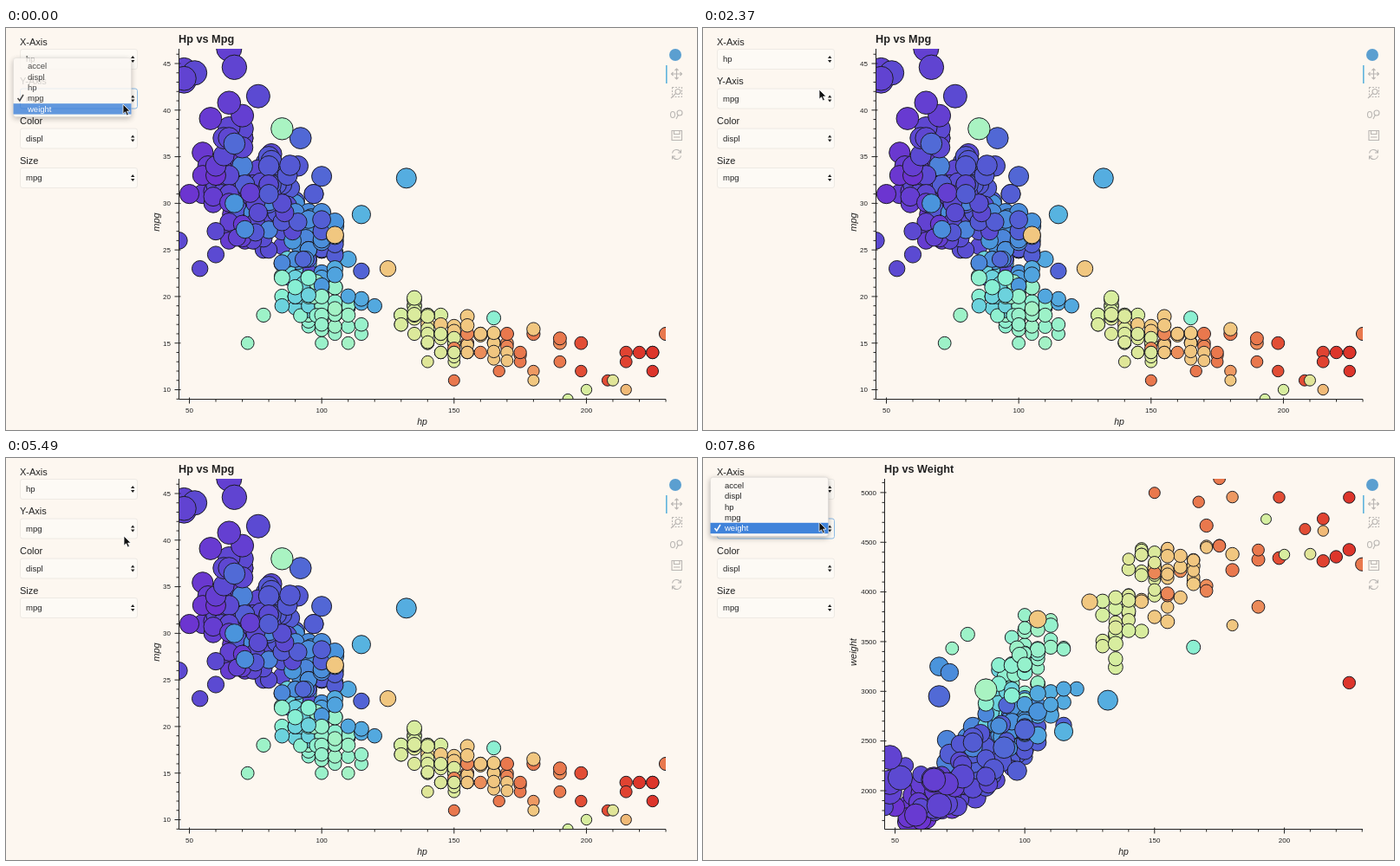
Recreate the animation shown at these times as an HTML page. Size 797 by 464 pixels, loop 8000 ms.

```html
<!DOCTYPE html>
<html lang="en">
<head>
<meta charset="utf-8">
<title>Scatter explorer</title>
<style>
html, body { margin: 0; width: 100%; height: 100%; overflow: hidden; background: #fdf7f0; }
svg { display: block; width: 797px; height: 464px; font-family: "Liberation Sans", Arial, sans-serif; fill: #222; }
.dots circle { stroke: #1c1c22; stroke-width: 1; }
.line { stroke: #222; stroke-width: 1; fill: none; }
.icon { stroke: #b9b6b3; stroke-width: 1.1; fill: none; }
.box { fill: #fdfaf5; stroke: #eeeae4; }
.box.focus { stroke: #8dbbe6; }
.menu { filter: drop-shadow(0 2px 3px rgba(0, 0, 0, .3)); }
</style>
</head>
<body>
<svg id="stage" viewBox="0 0 797 464"></svg>
<script>
const stage = document.getElementById('stage');
const LOOP = 8000, TOP = 24, BOTTOM = 428, RIGHT = 761;

function el(parent, tag, attrs = {}, text) {
  const node = document.createElementNS('http://www.w3.org/2000/svg', tag);
  for (const k in attrs) node.setAttribute(k, attrs[k]);
  if (text !== undefined) node.textContent = text;
  parent.appendChild(node);
  return node;
}
// Text centred vertically on y
function label(parent, x, y, size, text, attrs = {}) {
  return el(parent, 'text', { x, y: y + size * .35, 'font-size': size, ...attrs }, text);
}
const line = (parent, d, cls = 'line') => el(parent, 'path', { d, class: cls });
const lerp = (a, b, t) => a + (b - a) * t;

let seed = 20;
function rnd() {
  seed = (seed + 0x6D2B79F5) | 0;
  let t = Math.imul(seed ^ (seed >>> 15), 1 | seed);
  t = (t + Math.imul(t ^ (t >>> 7), 61 | t)) ^ t;
  return ((t ^ (t >>> 14)) >>> 0) / 4294967296;
}

const STOPS = ['7030d0', '5552d2', '4a93dc', '5cc0e2', '84efd6', 'a8f3c2', 'd2f2a3', 'f2d58a', 'f0a368', 'e4583a', 'dd352b'];
function rainbow(t) {
  t = Math.min(.9999, Math.max(0, t)) * (STOPS.length - 1);
  const i = Math.floor(t);
  const part = (s, k) => parseInt(s.substr(k, 2), 16);
  return `rgb(${[0, 2, 4].map(k => Math.round(lerp(part(STOPS[i], k), part(STOPS[i + 1], k), t - i)))})`;
}

// Outliers: hp, mpg, weight, displ, accel
const LIGHT = [
  [72, 15, 3432, 250, 21], [78, 18, 3574, 250, 21], [46, 26, 1835, 97, 20.5],
  [54, 23, 2254, 97, 23.5], [60, 27, 1834, 97, 19], [60, 24.5, 2164, 98, 22.1],
  [67, 30, 3250, 146, 21.8], [71, 27.2, 3190, 141, 24.8], [67, 36.4, 2950, 121, 19.9],
  [48, 43.1, 1985, 90, 21.5], [48, 44.3, 2085, 90, 21.7], [52, 44, 2130, 97, 24.6],
  [48, 43.4, 2335, 90, 23.7], [65, 46.6, 2110, 86, 17.9], [67, 44.6, 1850, 91, 13.8],
  [76, 41.5, 2144, 98, 14.7], [70, 39.4, 2070, 85, 18.6], [65, 40.8, 2110, 85, 19.2],
  [58, 39.1, 1755, 79, 16.9], [105, 26.6, 3725, 350, 19], [125, 23, 3900, 350, 17.4],
  [115, 28.8, 2595, 173, 11.3], [132, 32.7, 2910, 168, 11.4], [165, 17.7, 3445, 231, 13.4],
  [100, 32.9, 2615, 119, 14.8], [92, 37, 2434, 120, 15], [85, 38, 3015, 262, 17]
];
const HEAVY = [
  [198, 15, 4341, 429, 10], [220, 14, 4354, 454, 9], [215, 14, 4312, 440, 8.5],
  [225, 14, 4425, 455, 10], [225, 14, 3086, 455, 10], [198, 12, 4952, 429, 11.5],
  [208, 11, 4633, 429, 11], [215, 13, 4735, 440, 11], [225, 12, 4951, 455, 11],
  [230, 16, 4278, 400, 9.5], [190, 15, 3850, 390, 8.5], [190, 15.5, 4325, 400, 12],
  [190, 13, 4422, 400, 12.5], [215, 10, 4615, 360, 14], [200, 10, 4376, 307, 15],
  [210, 11, 4382, 318, 13.5], [193, 9, 4732, 304, 18.5], [175, 13, 5140, 400, 12],
  [180, 12, 4955, 383, 11.5], [167, 12, 4906, 400, 12.5], [150, 11, 4997, 400, 14],
  [180, 11, 3664, 350, 11], [180, 16, 4220, 400, 11], [180, 16.5, 4380, 350, 12.1],
  [170, 16, 4668, 400, 11.5], [175, 14, 4464, 400, 11.5], [155, 16.9, 4360, 350, 14.9]
];
// Clusters: count, then from/to for hp, mpg, weight, displ, accel
const CLUSTERS = [
  [36, 126, 153, 20.5, 12.6, 3150, 4650, 302, 318, 15.5, 11],
  [24, 140, 180, 18, 11.8, 3650, 4700, 345, 353, 14.5, 11],
  [8, 145, 185, 16.5, 12, 3700, 4750, 383, 402, 13, 9],
  [56, 83, 117, 23, 14.6, 2620, 3950, 225, 258, 15, 19.5],
  [16, 80, 102, 25, 17.5, 2550, 3300, 198, 200, 15, 18],
  [20, 84, 126, 29, 15.5, 2400, 3150, 151, 173, 16.5, 12.5],
  [46, 70, 113, 35, 18.5, 2150, 3050, 134, 151, 17.5, 13],
  [56, 64, 114, 37, 19, 1950, 2900, 105, 122, 17, 13.5],
  [50, 56, 97, 39, 21.5, 1750, 2420, 91, 104, 18, 14],
  [36, 48, 78, 38.5, 25, 1600, 2200, 70, 91, 19.5, 15]
];

function makeCars() {
  const cars = [];
  for (const [n, ...range] of CLUSTERS) {
    for (let i = 0; i < n; i++) {
      const base = rnd();
      const [hp, mpg, weight, displ, accel] = [0, 2, 4, 6, 8].map(k =>
        lerp(range[k], range[k + 1], base * .55 + rnd() * .45));
      const step = hp < 98 ? (rnd() < .4 ? 5 : 1) : 5;
      cars.push({
        hp: Math.round(hp / step) * step,
        mpg: rnd() < .6 ? Math.round(mpg) : mpg,
        weight, displ, accel, order: rnd()
      });
    }
  }
  [...HEAVY, ...LIGHT].forEach(([hp, mpg, weight, displ, accel], i) =>
    cars.push({ hp, mpg, weight, displ, accel, order: 1 + i }));
  return cars.sort((a, b) => a.order - b.order);
}

const cars = makeCars();
const tint = {
  displ: c => rainbow((c.displ - 68) / 387),
  accel: c => rainbow((c.accel - 8) / 16.8)
};
const AXES = {
  mpg: { title: 'Hp vs Mpg', left: 199, x50: 211.5, kx: 3.053, v0: 10, y0: 417.5, ky: 10.757, major: 5, lo: 9, hi: 46 },
  weight: { title: 'Hp vs Weight', left: 209, x50: 221.5, kx: 2.993, v0: 2000, y0: 384, ky: .1147, major: 500, lo: 1700, hi: 5100 }
};

function drawPlot(name, colour) {
  const a = AXES[name], g = el(stage, 'g');
  const px = hp => a.x50 + (hp - 50) * a.kx;
  const py = v => a.y0 - (v - a.v0) * a.ky;
  const clip = 'clip-' + name + colour;
  el(el(g, 'clipPath', { id: clip }), 'rect', { x: a.left, y: TOP, width: RIGHT - a.left, height: BOTTOM - TOP });

  label(g, a.left, 12.5, 12.7, a.title, { 'font-weight': 'bold' });
  const dots = el(g, 'g', { class: 'dots', 'clip-path': `url(#${clip})` });
  for (const c of cars) {
    el(dots, 'circle', {
      cx: px(c.hp).toFixed(1), cy: py(c[name]).toFixed(1),
      r: (6 + (c.mpg - 9) * .23).toFixed(1), fill: tint[colour](c)
    });
  }

  const x0 = a.left + .5, yb = BOTTOM + .5;
  let d = `M${x0} ${TOP}V${yb}H${RIGHT}`;
  for (let hp = 50; hp <= 230; hp += 10) {
    const big = hp % 50 === 0;
    d += `M${px(hp)} ${yb - (big ? 2 : 0)}V${yb + (big ? 5 : 3)}`;
    if (big) label(g, px(hp), 441, 8, hp, { 'text-anchor': 'middle' });
  }
  for (let v = a.lo; v <= a.hi; v += a.major / 5) {
    const big = v % a.major === 0;
    d += `M${x0 + (big ? 2 : 0)} ${py(v)}H${x0 - (big ? 5 : 3)}`;
    if (big) label(g, a.left - 9, py(v), 8, v, { 'text-anchor': 'end' });
  }
  line(g, d);
  const italic = { 'font-style': 'italic', 'text-anchor': 'middle' };
  label(g, (a.left + RIGHT) / 2, 454, 10.5, 'hp', italic);
  label(g, 0, 0, 11, name, { ...italic, transform: 'translate(173 224) rotate(-90)' });
  return g;
}

const plots = [drawPlot('mpg', 'displ'), drawPlot('weight', 'displ'), drawPlot('mpg', 'accel')];

function drawTools() {
  el(stage, 'circle', { cx: 772, cy: 31, r: 7, fill: '#5b9fd0' });
  el(stage, 'rect', { x: 761, y: 43, width: 1.6, height: 21, fill: '#5fb4dc' });
  line(stage, 'M767.5 53H779.5M773.5 47V59M769.5 51L767.5 53L769.5 55M777.5 51L779.5 53L777.5 55M771.5 49L773.5 47L775.5 49M771.5 57L773.5 59L775.5 57', 'icon');
  el(stage, 'rect', { x: 768.5, y: 68.5, width: 11, height: 11, class: 'icon', 'stroke-dasharray': '2 1.5' });
  line(stage, 'M772 76L767 81M778 73.5A3 3 0 1 1 772 73.5A3 3 0 1 1 778 73.5', 'icon');
  line(stage, 'M771.5 100A2.5 3.5 0 1 1 766.5 100A2.5 3.5 0 1 1 771.5 100M780 98A3 3 0 1 1 774 98A3 3 0 1 1 780 98M775 101L773 105', 'icon');
  line(stage, 'M768 118.5H779.5V129.5H768ZM770.5 118.5V122.5H777V118.5M770 126H777.5', 'icon');
  line(stage, 'M768.5 144.5A5 5 0 0 1 778 143.5M778.5 140.5V144H775M778.5 147.5A5 5 0 0 1 769 148.5M768.5 151.5V148H772', 'icon');
}
drawTools();

const ROW = 12.4;
const FIELDS = ['accel', 'displ', 'hp', 'mpg', 'weight'];

function drawSelect(name, y, value) {
  label(stage, 16, y - 20, 11, name);
  const box = el(stage, 'rect', { x: 16.5, y: y - 11.5, width: 135, height: 23, rx: 2.5, class: 'box' });
  const text = label(stage, 23, y, 9.5, value);
  el(stage, 'path', { d: `M144 ${y - 1}L146.2 ${y - 4}L148.4 ${y - 1}ZM144 ${y + 1}L146.2 ${y + 4}L148.4 ${y + 1}Z` });
  return { box, text };
}
drawSelect('X-Axis', 36, 'hp');
const ySelect = drawSelect('Y-Axis', 81.5, 'mpg');
const cSelect = drawSelect('Color', 127.5, 'displ');
drawSelect('Size', 173, 'mpg');

function makeMenu(items, y) {
  const g = el(stage, 'g', { class: 'menu' });
  const frame = el(g, 'rect', { x: 8.5, width: 136, height: items.length * ROW + 6, rx: 3, fill: '#fcf8f3', stroke: '#d9d6d2', 'stroke-width': .6 });
  const bar = el(g, 'rect', { x: 8.5, width: 136, height: ROW, fill: '#4083da' });
  const check = el(g, 'path', { d: 'M13.5 0L15.8 3L20 -4', fill: 'none', 'stroke-width': 1.5 });
  const rows = items.map(t => label(g, 25, 0, 9.5, t));
  return (visible, value, hover, opacity) => {
    g.style.display = visible ? '' : 'none';
    if (!visible) return;
    const on = items.indexOf(value), first = y - on * ROW;
    g.style.opacity = opacity;
    frame.setAttribute('y', first - ROW / 2 - 3);
    bar.setAttribute('y', first + (hover - .5) * ROW);
    bar.style.display = hover < 0 ? 'none' : '';
    check.setAttribute('transform', `translate(0 ${y})`);
    check.setAttribute('stroke', hover === on ? '#fff' : '#222');
    rows.forEach((r, i) => {
      r.setAttribute('y', first + i * ROW + 3.3);
      r.setAttribute('fill', i === hover ? '#fff' : '#222');
    });
  };
}
const yMenu = makeMenu(FIELDS, 81);
const cMenu = makeMenu(['None', ...FIELDS], 127);

const cursor = el(stage, 'path', {
  d: 'M0 0V11.2L2.6 8.8L4.4 13L6.4 12.1L4.6 8.1H8Z', fill: '#111', stroke: '#fff', 'stroke-width': .8
});

// Each step carries over whatever it does not change
const STEPS = [
  { t: 0, y: 'mpg', color: 'displ', plot: 0, open: 'y', hover: 4, fade: .82, at: [135, 88] },
  { t: 140, fade: .4 },
  { t: 290, y: 'weight', open: '', fade: 1 },
  { t: 590, plot: 1, at: [135, 86] },
  { t: 740, at: [134, 80] },
  { t: 890, at: [134, 74] },
  { t: 1040, open: 'y', hover: 4 },
  { t: 1340, hover: 3, at: [134, 72] },
  { t: 1490, at: [134, 71] },
  { t: 1640, hover: -1 },
  { t: 1790, hover: 3, fade: .4 },
  { t: 1930, y: 'mpg', open: '', fade: 1 },
  { t: 2220, plot: 0 },
  { t: 2970, color: 'accel', plot: 2, at: [134, 125] },
  { t: 3410, at: [130, 123] },
  { t: 3560, at: [125, 121] },
  { t: 4010, open: 'color', hover: 2 },
  { t: 4160, at: [125, 127] },
  { t: 4300, hover: 3, at: [125, 135] },
  { t: 4450, at: [125, 141] },
  { t: 4750, hover: -1 },
  { t: 4900, hover: 3, fade: .5 },
  { t: 5040, color: 'displ', open: '', fade: 1, at: [126, 135] },
  { t: 5190, plot: 0, at: [129, 120] },
  { t: 5340, at: [133, 103] },
  { t: 5490, at: [136, 90] },
  { t: 5780, open: 'y', hover: 4 },
  { t: 6080, hover: 3, at: [136, 84] },
  { t: 6230, at: [135, 78] },
  { t: 6380, hover: 2, at: [135, 70] },
  { t: 6530, hover: 3, at: [135, 78] },
  { t: 6680, at: [135, 84] },
  { t: 6830, hover: 4, at: [135, 90] },
  { t: 6980, at: [135, 88] },
  { t: 7130, fade: .5 },
  { t: 7270, y: 'weight', open: '', fade: 1 },
  { t: 7420, at: [135, 83] },
  { t: 7570, plot: 1, at: [134, 78] },
  { t: 7710, at: [134, 74] },
  { t: 7860, open: 'y', hover: 4 }
];
let carry = {};
const states = STEPS.map(s => (carry = { ...carry, ...s }));

function show(s) {
  plots.forEach((p, i) => { p.style.display = i === s.plot ? '' : 'none'; });
  ySelect.text.textContent = s.y;
  cSelect.text.textContent = s.color;
  ySelect.box.classList.toggle('focus', s.open === 'y');
  cSelect.box.classList.toggle('focus', s.open === 'color');
  yMenu(s.open === 'y', s.y, s.hover, s.fade);
  cMenu(s.open === 'color', s.color, s.hover, s.fade);
  cursor.setAttribute('transform', `translate(${s.at})`);
}

const start = performance.now();
let current;
function tick() {
  const t = (performance.now() - start) % LOOP;
  let next = states[0];
  for (const s of states) if (s.t <= t) next = s;
  if (next !== current) show(current = next);
  requestAnimationFrame(tick);
}
tick();
</script>
</body>
</html>
```
